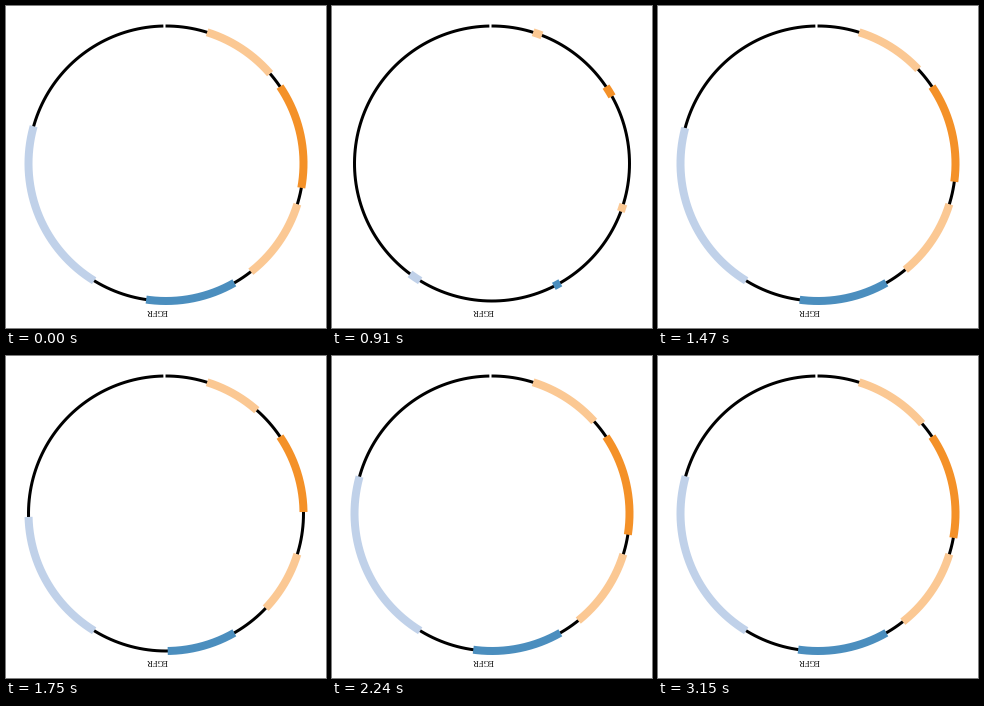
Animation, 320 px wide and 322 px high, one loop 3.43 s. Source, as a matplotlib script:

```python
import numpy as np
import matplotlib.pyplot as plt
from matplotlib.animation import FuncAnimation

W, H, DPI = 320, 322, 64
PT = 72 / DPI                      # points per pixel
STEP, FRAMES = 70, 49
CX, CY, R = 160, 157.5, 137.5
BEGIN, STAGGER, DURATION = 642, 17, 2100

# start and end in degrees clockwise from the top, colour
DOMAINS = [
    (17.4, 49.2, "#fbc893"),
    (56.0, 100.2, "#f49128"),
    (107.2, 141.9, "#fbc893"),
    (150.2, 188.3, "#4b8ebe"),
    (211.5, 285.7, "#c0d1e9"),
]


def arc(start, end):
    a = np.radians(np.linspace(start, end, 200))
    return CX + R * np.sin(a), CY - R * np.cos(a)


def bounce(t):
    if t < 4 / 11:
        return 7.5625 * t * t
    if t < 8 / 11:
        return 7.5625 * (t - 6 / 11) ** 2 + 0.75
    if t < 10 / 11:
        return 7.5625 * (t - 9 / 11) ** 2 + 0.9375
    return 7.5625 * (t - 21 / 22) ** 2 + 0.984375


def growth(index, ms):
    """Share of a domain that is visible; it is full before and after its bounce."""
    t = (ms - BEGIN - index * STAGGER) / DURATION
    return bounce(t) if 0 <= t < 1 else 1.0


fig = plt.figure(figsize=(W / DPI, H / DPI), dpi=DPI, facecolor="white")
ax = fig.add_axes([0, 0, 1, 1])
ax.set_xlim(0, W)
ax.set_ylim(H, 0)
ax.axis("off")

ax.plot(*arc(-0.2, 358.9), color="black", lw=3 * PT, solid_capstyle="butt")
bars = [
    ax.plot([], [], color=color, lw=8 * PT, solid_capstyle="butt")[0]
    for _, _, color in DOMAINS
]
ax.text(161.3, 303, "EGFR", family="Liberation Serif", fontsize=8.5 * PT,
        rotation=180, rotation_mode="anchor", ha="left", va="baseline")


def draw(frame):
    ms = frame * STEP
    for i, (bar, (start, end, _)) in enumerate(zip(bars, DOMAINS)):
        bar.set_data(*arc(start, start + (end - start) * growth(i, ms)))
    return bars


anim = FuncAnimation(fig, draw, frames=FRAMES, interval=STEP, repeat=True,
                     repeat_delay=0, blit=False)
plt.show()
```
